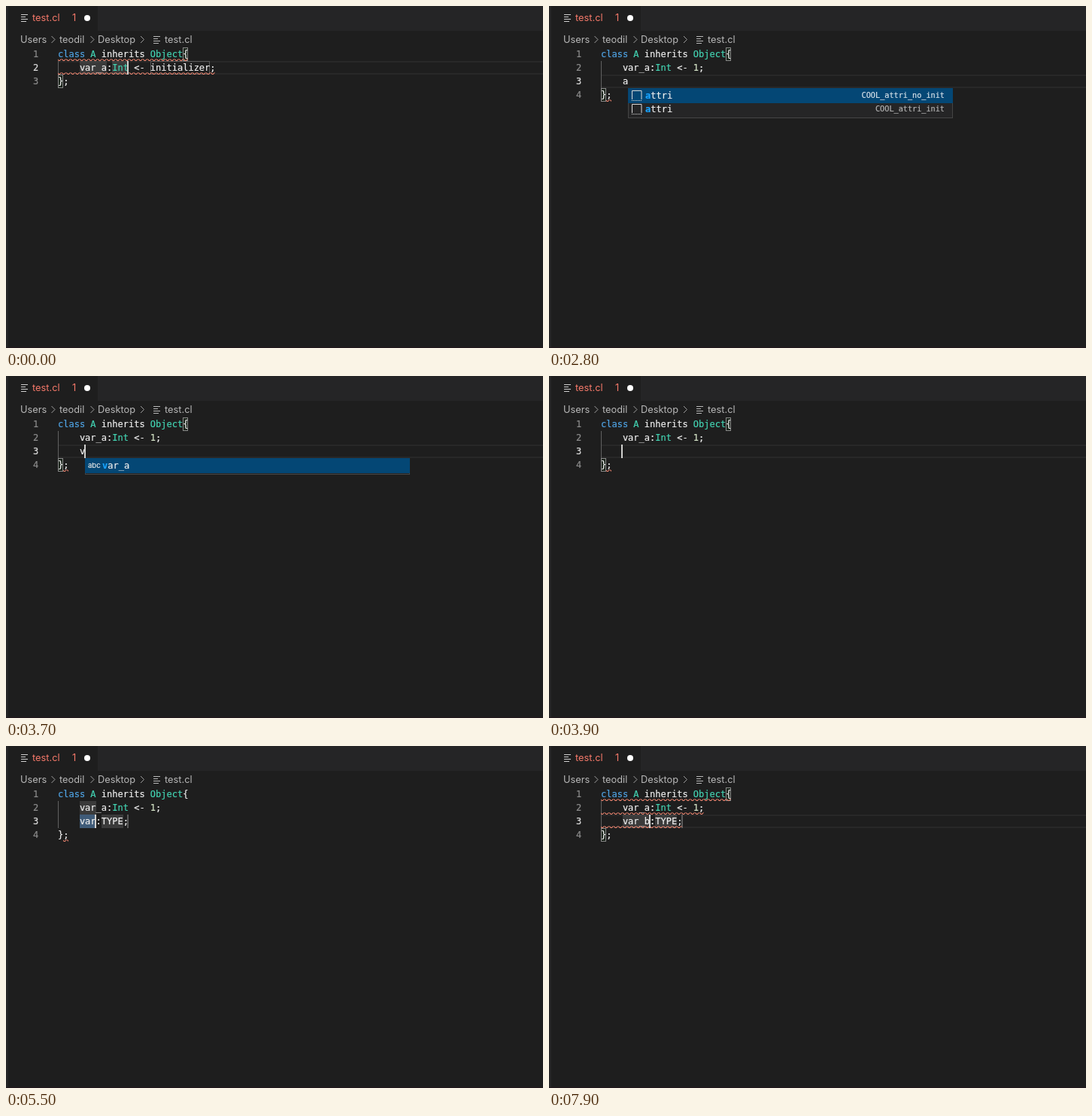
An HTML page for the animation above (8 s loop, 714 by 454 pixels).

```html
<!DOCTYPE html>
<html lang="en">
<head>
<meta charset="utf-8">
<title>Editor</title>
<style>
html, body { margin: 0; width: 100%; height: 100%; overflow: hidden; background: #1e1e1e; }
#stage { position: relative; width: 714px; height: 454px; overflow: hidden; background: #1e1e1e; }
#stage div, #stage svg, #stage span.at { position: absolute; box-sizing: border-box; white-space: pre; }
.tabs { left: 122px; top: 0; width: 592px; height: 33px; background: #252526; }
.side { left: 0; top: 0; width: 3px; height: 454px; background: #252526; }
.foot { left: 0; top: 453px; width: 714px; height: 1px; background: #23181d; }
.ui { font: 12.8px/18px Inter, "Open Sans", sans-serif; color: #b8b8b8; }
.err { color: #f6796a; }
.dot { left: 104px; top: 12px; width: 8px; height: 8px; border-radius: 50%; background: #fff; }
.code { font: 12px/18px "DejaVu Sans Mono", monospace; color: #eee; height: 18px; -webkit-text-stroke: .2px; }
.kw { color: #4fa3e3; }
.type { color: #43d3b2; }
.num { color: #d3e2c6; }
.no { color: #8c8c8c; }
.now { color: #dcdcdc; }
.row { border: 2px solid #282828; border-right: 0; border-left: 0; }
.guide { background: #606060; }
.sel { background: #264f78; }
.mark { background: rgba(124, 124, 124, .3); }
.box { border: 1px solid #5a5a5a; }
.pair { border: 1px solid #888; background: rgba(0, 100, 0, .1); }
.caret { background: #d0d0ce; }
.pop { background: #252526; border: 1px solid #454545; width: 432px; top: 109px; }
.pick { background: #044775; box-shadow: 0 0 0 1px #044775; }
.hit { color: #18a3ff; font-weight: bold; }
.info { right: 10px; top: 0; font-size: 10.2px; color: #b4b4b4; }
.pick .info { color: #d8e2ea; }
.abc { left: 3px; top: 0; font: 9.5px/18px Inter, sans-serif; color: #e8e8e8; }
</style>
</head>
<body>
<div id="stage">
  <div class="tabs"></div>
  <div class="side"></div>
  <div class="foot"></div>
  <svg width="714" height="56" style="left:0;top:0" fill="none">
    <defs>
      <pattern id="wave" width="6" height="3" patternUnits="userSpaceOnUse">
        <path fill="#f48771" d="M5.5 0 2.5 3H1.1L4.1 0ZM4 0 6 2V.6L5.4 0ZM0 2 1 3H2.4L0 .6Z"/>
      </pattern>
      <path id="lines" d="M0 .5H9M0 3.5H6M0 6.5H9M0 9.5H7"/>
      <path id="arrow" d="M0 0 4.5 4.5 0 9"/>
    </defs>
    <use href="#lines" x="20" y="11" stroke="#d0d0d0"/>
    <use href="#lines" x="196" y="40" stroke="#b8b8b8"/>
    <g stroke="#a0a0a0">
      <use href="#arrow" x="60.5" y="40"/>
      <use href="#arrow" x="112.5" y="40"/>
      <use href="#arrow" x="179" y="40"/>
    </g>
  </svg>
  <div class="ui err" style="left:35px;top:7px">test.cl</div>
  <div class="ui err" style="left:88px;top:7px">1</div>
  <div class="dot"></div>
  <div class="ui" style="left:19px;top:36px">Users</div>
  <div class="ui" style="left:71px;top:36px">teodil</div>
  <div class="ui" style="left:122px;top:36px">Desktop</div>
  <div class="ui" style="left:211px;top:36px">test.cl</div>
  <div id="editor" style="left:0;top:0;width:714px;height:454px"></div>
</div>
<script>
const LOOP = 8000, LEFT = 69, TOP = 55, ROW = 18, CH = 7.224;
const editor = document.getElementById('editor');
const HEAD = 'class A inherits Object{';
const LINE = '    var_a:Int <- 1;';

const attri = n => ({ n, snip: true, items: [['attri', 'COOL_attri_no_init'], ['attri', 'COOL_attri_init']] });
const words = { n: 1, snip: false, items: [['var_a', '']] };
const typed = s => ({ body: [LINE, '    ' + s], cur: [2, 4 + s.length], on: true, pop: null });
// Text typed into the first field of the snippet
const field = s => {
  const c = 4 + s.length;
  return {
    body: [LINE, '    ' + s + ':TYPE;'], cur: [2, c], on: true, sel: null, pair: true,
    marks: [[2, 4, c], [2, c + 1, c + 5]], boxes: [[2, c + 6, c + 6]]
  };
};

// Each step changes only the listed parts of the state
const steps = [
  [0, { body: ['    var_a:Int <- initializer;'], cur: [1, 13], on: true, sel: null, pair: true, wave: 'all',
        marks: [[1, 4, 9], [1, 10, 13]], boxes: [[1, 17, 28]], pop: null }],
  [100, { cur: [1, 28], sel: [1, 17, 28], marks: [], boxes: [], pair: false }],
  [500, { on: false }],
  [900, { body: [LINE], cur: [1, 18], on: true, sel: null, pair: true }],
  [1500, { on: false }],
  [1700, { ...typed(''), wave: 'end' }],
  [2000, typed('a')],
  [2100, { pop: attri(1) }],
  [2500, { on: false }],
  [2900, typed('')],
  [3600, typed('v')],
  [3700, { pop: words }],
  [3900, typed('')],
  [4000, typed('a')],
  [4100, { pop: attri(1) }],
  [4200, { ...typed('at'), pop: attri(2) }],
  [4800, { on: false }],
  [5300, { ...field('var'), pop: null, pair: false, sel: [2, 4, 7],
           marks: [[1, 4, 7], [2, 4, 7], [2, 8, 12]] }],
  [5800, { on: false }],
  [6300, { on: true }],
  [6800, field('v')],
  [6900, field('va')],
  [7000, { ...field('var'), wave: 'all' }],
  [7100, field('var_')],
  [7600, { on: false }],
  [7800, field('var_b')]
];

const states = [];
for (const [at, change] of steps) {
  const last = states[states.length - 1];
  states.push({ ...last, ...change, at });
}

const div = (cls, x, y, w, h, inner = '') =>
  `<div class="${cls}" style="left:${x}px;top:${y}px;width:${w}px;height:${h}px">${inner}</div>`;
const colX = c => LEFT + c * CH;
const edgeX = c => Math.floor(colX(c)) - 1;
const rowY = r => TOP + r * ROW;
const span = (cls, [r, a, b]) => a === b
  ? div(cls, edgeX(a), rowY(r), 1, ROW)
  : div(cls, colX(a), rowY(r), (b - a) * CH, ROW);
const squiggle = (r, a, b) =>
  `<svg width="${(b - a) * CH}" height="3" style="left:${colX(a)}px;top:${rowY(r) + 15}px">` +
  '<rect width="100%" height="3" fill="url(#wave)"/></svg>';

const paint = s => s.replace('<', '&lt;').replace(/\b(?:(class)|(A|Object|Int)|(\d+))\b/g,
  (m, kw, type) => `<span class="${kw ? 'kw' : type ? 'type' : 'num'}">${m}</span>`);

function popup({ n, snip, items }) {
  const icon = snip
    ? '<svg width="14" height="14" style="left:4px;top:2px" fill="none" stroke="#d8d8d8">' +
      '<path d="M.5 12V.5H13V12"/><path d="M0 13.5H14" stroke-dasharray="1 1"/></svg>'
    : '<span class="at abc">abc</span>';
  const rows = items.map(([name, info], i) =>
    div('code' + (i ? '' : ' pick'), 0, i * ROW, 430, ROW,
      icon + `<span class="at" style="left:22px"><span class="hit">${name.slice(0, n)}</span>${name.slice(n)}</span>` +
      `<span class="at info">${info}</span>`)).join('');
  return `<div class="pop" style="left:${Math.round(colX(4 + n))}px;height:${items.length * ROW + 4}px">${rows}</div>`;
}

function draw(s) {
  const lines = [HEAD, ...s.body, '};'];
  const end = lines.length - 1;
  const [row, col] = s.cur;
  let out = '';
  if (!s.sel) out += div('row', LEFT, rowY(row), 714 - LEFT, ROW);
  out += div('guide', LEFT, rowY(1), 1, ROW * s.body.length);
  if (s.sel) out += span('sel', s.sel);
  out += s.marks.map(m => span('mark', m)).join('');
  out += s.boxes.map(b => span('box', b)).join('');
  if (s.pair) out += span('pair', [0, 23, 24]) + span('pair', [end, 0, 1]);
  lines.forEach((text, i) => {
    out += div('code ' + (i === row ? 'now' : 'no'), 36, rowY(i), 8, ROW, i + 1);
    out += div('code', LEFT, rowY(i), 400, ROW, paint(text));
    if (s.wave === 'all' && i < end) out += squiggle(i, 0, text.length);
  });
  if (s.wave === 'end') out += squiggle(end, 1, 2);
  if (s.on) out += div('caret', edgeX(col), rowY(row), 2, ROW);
  if (s.pop) out += popup(s.pop);
  editor.innerHTML = out;
}

let shown = null;
const start = performance.now();
function tick() {
  const t = Math.max(0, performance.now() - start) % LOOP;
  const s = states.findLast(v => v.at <= t);
  if (s !== shown) draw(shown = s);
  requestAnimationFrame(tick);
}
tick();
</script>
</body>
</html>
```
